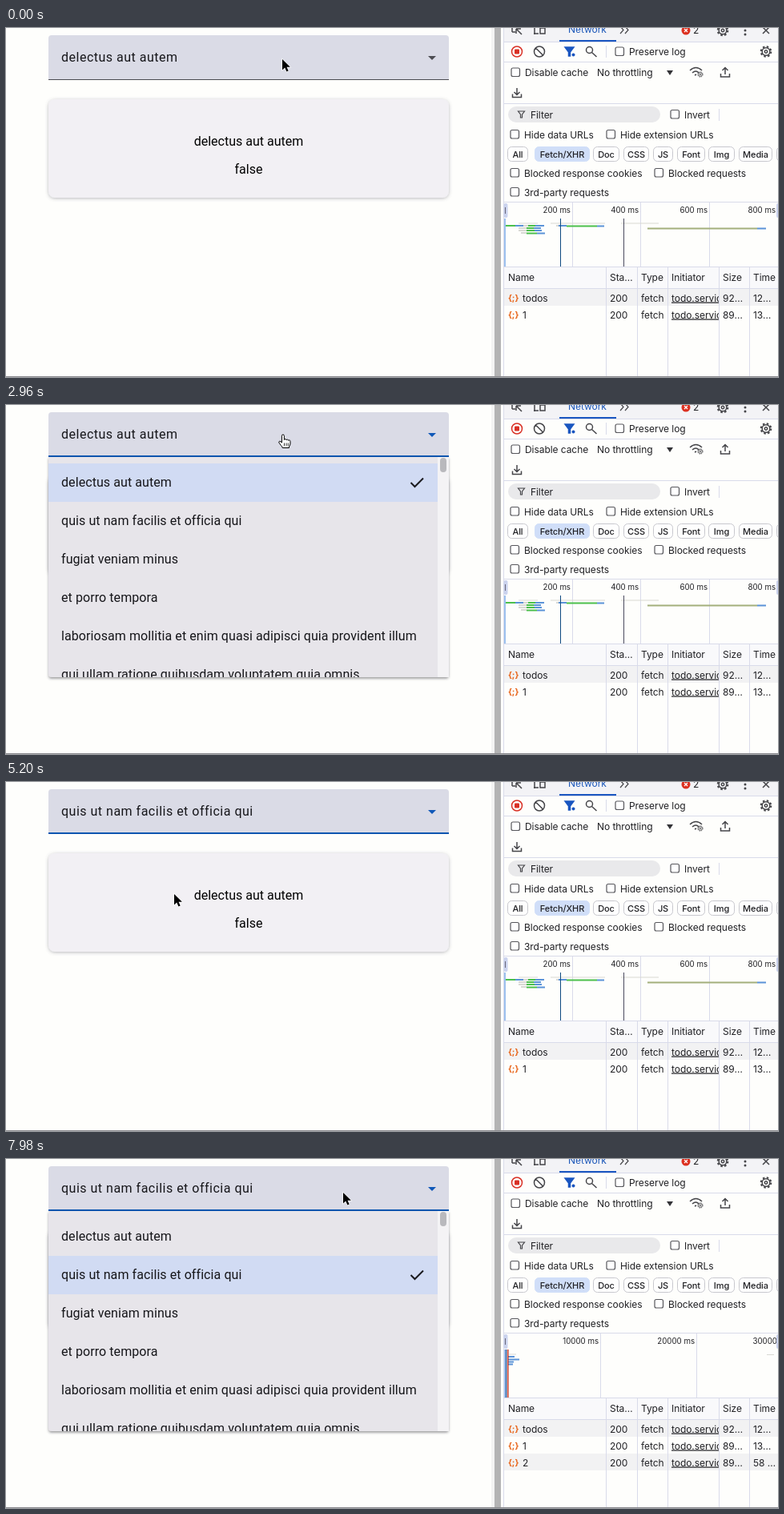
An HTML page that plays this animation: 964x436 px, repeating every 8 s.

```html
<!DOCTYPE html>
<html lang="en">
<head>
<meta charset="utf-8">
<title>Todo select with network panel</title>
<style>
html, body { margin: 0; width: 100%; height: 100%; overflow: hidden; background: #fefefc; }
svg { display: block; width: 964px; height: 436px; }
text { white-space: pre; }
.app { font: 16px Roboto, sans-serif; fill: #16161a; }
.field { letter-spacing: .5px; }
.list { letter-spacing: .08px; }
.card { text-anchor: middle; fill: #000; }
.ui { font: 12px Inter, sans-serif; letter-spacing: -.06px; fill: #202024; }
.chip { font: 500 11px Inter, sans-serif; text-anchor: middle; letter-spacing: -.1px; fill: #202024; }
.tick { font: 9.7px Inter, sans-serif; text-anchor: end; fill: #202024; }
.icon { fill: none; stroke: #454549; stroke-width: 1.5; }
.line { stroke: #d9dbea; }
</style>
</head>
<body>
<svg viewBox="0 0 964 436" id="stage">
  <defs>
    <filter id="soft" x="-5%" y="-10%" width="110%" height="125%">
      <feDropShadow dx="0" dy="1" stdDeviation="2" flood-color="#55555f" flood-opacity=".4"/>
    </filter>
    <filter id="lift" x="-5%" y="-10%" width="110%" height="125%">
      <feDropShadow dx="0" dy="2" stdDeviation="1.6" flood-color="#33333a" flood-opacity=".45"/>
    </filter>
    <clipPath id="panelClip"><rect x="53" y="65" width="500" height="275"/></clipPath>
    <clipPath id="nameClip"><rect x="828" y="326" width="62" height="70"/></clipPath>
  </defs>
  <rect width="964" height="436" fill="#fefefc"/>
  <g id="app">
    <path id="fieldBox" d="M53 65V13q0-4 4-4H549q4 0 4 4V65z"/>
    <text id="fieldText" class="app field" x="69" y="42"/>
    <path id="caret" d="M527 35h10l-5 5z"/>
    <rect id="underline" x="53" width="500"/>
    <rect x="53" y="89" width="500" height="123" rx="8" fill="#f2f0f4" filter="url(#soft)"/>
    <text id="cardText" class="app card" x="303" y="147"/>
    <text class="app card" x="303" y="182">false</text>
  </g>
  <g id="panel">
    <path d="M53 65H553V336q0 4-4 4H57q-4 0-4-4z" fill="#e7e5ea" filter="url(#lift)"/>
    <rect x="539" y="65" width="14" height="275" fill="#f4f3f5"/>
    <rect x="542" y="66" width="8" height="18" rx="4" fill="#b9b9bd"/>
    <rect id="hover" x="53" y="121" width="486" height="48" fill="#d5d2d6"/>
    <rect id="chosen" x="53" width="486" height="48" fill="#d1dbf3"/>
    <g id="items" clip-path="url(#panelClip)"/>
    <path id="check" d="M505.500 97l5 5L521 91.500" fill="none" stroke="#1a1a1e" stroke-width="2"/>
  </g>
  <g id="tools"></g>
  <g id="early"></g>
  <g id="late"></g>
  <path d="M0 435.500H964" stroke="#8b8b8f"/>
  <g id="cursor">
    <path id="arrow" d="M0 0V13.500l3.200-3 2.200 5 2.300-1-2.200-4.700h4.400z" fill="#000" stroke="#fff" stroke-width="1.200" paint-order="stroke"/>
    <g id="hand" stroke="#000" fill="#fff">
      <path d="M-1.600 10V1.500a1.500 1.500 0 0 1 3 0V6.500a1.400 1.400 0 0 1 2.700.3 1.400 1.400 0 0 1 2.600.6 1.300 1.300 0 0 1 2.300 1V11q0 2-1.500 4v1.500H-.8q0-1.500-2-3.200L-5 10.200q-.8-1.600.6-1.900 1.400-.1 2.800 1.700z"/>
      <path d="M1.500 10.500v3.500M4 10.500v3.500M6.300 10.500v3.500" stroke-width=".8"/>
    </g>
  </g>
</svg>
<script>
const LOOP = 8000, WAKE = 1000, OPEN = 2750, PICK = 5080, LOADED = 5300, REOPEN = 7300;
const titles = [
  'delectus aut autem', 'quis ut nam facilis et officia qui', 'fugiat veniam minus',
  'et porro tempora', 'laboriosam mollitia et enim quasi adipisci quia provident illum',
  'qui ullam ratione quibusdam voluptatem quia omnis'
];
const $ = id => document.getElementById(id);
const set = (id, attrs) => { for (const k in attrs) $(id).setAttribute(k, attrs[k]); };
const show = (id, on) => set(id, { visibility: on ? 'visible' : 'hidden' });

// Markup helpers
const text = (x, y, s, cls = 'ui', more = '') => `<text class="${cls}" x="${x}" y="${y}" ${more}>${s}</text>`;
const rect = (x, y, w, h, fill, more = '') => `<rect x="${x}" y="${y}" width="${w}" height="${h}" fill="${fill}" ${more}/>`;
const path = (d, more = '') => `<path class="icon" d="${d}" ${more}/>`;
const rule = d => `<path class="line" d="${d}"/>`;
const box = (x, y, label) =>
  rect(x - 5, y - 5.500, 10.500, 10.500, '#fff', 'rx="2" stroke="#57575c" stroke-width="1.200"') + text(x + 12, y + 4.500, label);
const chip = (x, w, label, on) =>
  rect(x + .5, 148.500, w - 1, 18, on ? '#d0def8' : '#fefefe', `rx="5" stroke="${on ? '#d0def8' : '#c8c8ce'}"`) +
  text(x + w / 2, 162, label, 'chip');
const gear = (x, y, size = 1) =>
  `<g transform="translate(${x} ${y}) scale(${size})"><circle class="icon" r="4.800"/><circle class="icon" r="1.700"/>` +
  `<circle class="icon" r="6.300" style="stroke-width:2;stroke-dasharray:2.500 2.450"/></g>`;
const bar = (x1, x2, y, fill) => rect(x1, y, x2 - x1, 2, fill);
const columns = (y1, y2) => [749.500, 788.500, 826.500, 890.500, 928.500].map(x => rule(`M${x} ${y1}V${y2}`)).join('');
const stripe = y => rect(622, y, 342, 21, '#f2f2f3');

function toolbar() {
  return rect(606, 0, 358, 436, '#fefefc') +
    rect(606, 0, 4, 436, '#f3f3f3') + rect(610, 0, 8, 436, '#b3b3b4') + rule('M621.500 0V436') +
    rect(622, 0, 342, 17, '#f3f3f6') + rule('M622 17.500H964') +
    path('M636 5h-4M632 5V0M644 0v-1M637 1l7 7M637 1v6M637 1h6') +
    path('M660 8V-2M659 7h6M667 7V0h6v7z') +
    text(702, 6, 'Network', 'ui', 'style="fill:#1a56b8"') + rect(691, 15, 71, 2, '#1a56c0') +
    path('M767-2l4 4.500-4 4.500M773-2l4 4.500-4 4.500', 'style="stroke-width:1.200"') +
    '<circle cx="849" cy="3" r="5.500" fill="#dc3020"/><path d="M847 1l4 4M851 1l-4 4" stroke="#fff" stroke-width="1.300"/>' +
    text(858, 7, '2') + gear(895, 3) +
    [-2, 3, 8].map(y => `<circle cx="923" cy="${y}" r="1.500" fill="#454549"/>`).join('') +
    path('M945-1l8 8M953-1l-8 8') +

    '<circle cx="638" cy="29.500" r="6.500" fill="none" stroke="#d93025" stroke-width="1.500"/>' +
    rect(635, 26.500, 6, 6, '#d93025', 'rx="1"') +
    path('M661.500 25l9 9M672.500 29.500a6.500 6.500 0 1 1-13 0a6.500 6.500 0 1 1 13 0z') +
    path('M698 24h11l-4.500 6v5h-2v-5z', 'style="stroke:#1a56c0;fill:#1a56c0"') +
    '<circle cx="708.500" cy="33.500" r="2" fill="#1a56c0"/>' +
    path('M732.500 27.500a4 4 0 1 1-8 0a4 4 0 1 1 8 0M731.500 30.500l6 5.500') +
    rule('M749.500 22V37') + box(766, 29.500, 'Preserve log') + gear(949, 29.500) + rule('M622 42.500H964') +

    box(636, 55.500, 'Disable cache') + text(738, 60, 'No throttling') +
    '<path d="M825 53h8l-4 6z" fill="#333337"/>' +
    path('M854 53q7.500-7 15 0M857 56q4.500-4 8 0M860 59l2-1') + gear(867, 58, .5) +
    path('M898 58V50M894.500 53l3.500-3.500 3.500 3.500M892.500 57v4h11v-4') +
    path('M638 75v8M634.500 80l3.500 3.500 3.500-3.500M632.500 82.500v4h11v-4') + rule('M622 94.500H964') +

    rect(627, 98, 190, 20, '#e9e9eb', 'rx="10"') +
    path('M639.500 104h8l-3 4v4h-2v-4z', 'style="stroke-width:1.200"') + text(655, 112.500, 'Filter') +
    box(835, 108, 'Invert') + rule('M890.500 101V116') +
    box(635, 133, 'Hide data URLs') + box(755, 133, 'Hide extension URLs') +
    chip(626, 26, 'All') + chip(660, 69, 'Fetch/XHR', true) + chip(733, 33, 'Doc') + chip(771, 32, 'CSS') +
    chip(808, 25, 'JS') + chip(838, 35, 'Font') + chip(877, 33, 'Img') + chip(915, 42, 'Media') + chip(962, 40, '') +
    box(635, 181, 'Blocked response cookies') + box(815, 181, 'Blocked requests') + box(635, 205, '3rd-party requests') +
    rule('M622 217.500H964') + rule('M622 298.500H964') +
    rect(622, 299, 342, 26, '#f9f9fb') + stripe(326) + rule('M622 325.500H964');
}

function row(y, name, size, time) {
  return text(627, y + 4, '{;}', 'ui', 'style="font-weight:700;font-size:10.500px;fill:#e8651a"') +
    text(645, y + 4.500, name) + text(754, y + 4.500, '200') + text(793, y + 4.500, 'fetch') +
    text(831, y + 4.500, 'todo.service.ts', 'ui', 'text-decoration="underline" clip-path="url(#nameClip)"') +
    text(895, y + 4.500, size) + text(933, y + 4.500, time);
}

function table() {
  const heads = [[627, 'Name'], [754, 'Sta…'], [793, 'Type'], [831, 'Initiator'], [895, 'Size'], [933, 'Time']];
  return columns(299, 436) + heads.map(([x, s]) => text(x, 316, s)).join('') +
    row(337, 'todos', '92…', '12…') + row(358, '1', '89…', '13…');
}

const handles = () =>
  rect(621.500, 219, 5, 18, '#cbd3ee', 'rx="2"') + rect(623, 224, 1, 8, '#66667a') + rect(962, 219, 5, 18, '#cbd3ee', 'rx="2"');

function shortTimeline() {
  const green = '#4cc04c', blue = '#5b93d8', pale = '#d9d9d4', olive = '#a3b07c';
  return [707.500, 792.500, 878.500].map(x => rule(`M${x} 218V298`)).join('') +
    [[705, 200], [790, 400], [876, 600], [961, 800]].map(([x, n]) => text(x, 231, n + ' ms', 'tick')).join('') +
    rect(622, 238, 2, 60, '#9cc0ee') +
    bar(624, 636, 246, green) + bar(636, 646, 246, blue) + bar(646, 652, 246, pale) + bar(652, 661, 246, green) + bar(661, 672, 246, blue) +
    bar(640, 650, 249, pale) + bar(650, 659, 249, green) + bar(659, 668, 249, blue) +
    bar(640, 650, 252, pale) + bar(650, 660, 252, green) + bar(660, 669, 252, blue) +
    bar(643, 650, 255, pale) + bar(650, 663, 255.500, green) + bar(663, 673, 255.500, blue) +
    rect(640, 243.500, 24, 1, pale) + rect(680, 243.500, 68, 1, pale) + rect(768, 243.500, 47, 1, pale) +
    bar(687, 690, 246, pale) + bar(690, 700, 246, blue) + bar(700, 738, 246.500, green) + bar(738, 747, 246.500, blue) +
    bar(801, 938, 249.500, olive) + bar(938, 949, 249.500, blue) +
    rect(692, 238, 1, 60, '#0f4a80') + rect(771, 238, 1, 60, '#4a4a5e') + handles();
}

function longTimeline() {
  const blue = '#5b93d8', pale = '#d9d9d4';
  return [742.500, 862.500].map(x => rule(`M${x} 218V298`)).join('') +
    text(740, 231, '10000 ms', 'tick') + text(860, 231, '20000 ms', 'tick') +
    text(932.500, 231, '30000 ms', 'tick', 'style="text-anchor:start"') +
    bar(627, 635, 246, blue) + bar(627, 641, 249.500, blue) + bar(627, 634, 252.500, blue) + bar(627, 633, 255.500, blue) +
    rect(628, 243.500, 9, 1, pale) + rect(950, 244, 9, 1, pale) +
    rect(622, 238, 2, 60, '#9cc0ee') + rect(624, 238, 1.200, 60, '#174a8c') + rect(626, 238, 1.500, 60, '#c93a28') + handles() +
    stripe(368) + columns(368, 389) + row(379, '2', '89…', '58 …');
}

$('tools').innerHTML = toolbar() + table();
$('early').innerHTML = shortTimeline();
$('late').innerHTML = longTimeline();
$('items').innerHTML = titles.map((s, i) => text(69, 102 + 48 * i, s, 'app list')).join('');

// Pointer stops: time, x, y
const stops = [
  [0, 345, 39], [WAKE, 345, 39], [1250, 347, 33], [2000, 347, 33], [2400, 346, 37], [3100, 346, 37],
  [3780, 229, 121], [4200, 210, 140], [5600, 210, 140], [6450, 426, 30],
  [6850, 426, 30], [7150, 421, 42], [LOOP, 421, 42]
];
const clamp = u => Math.max(0, Math.min(1, u));
const ramp = (t, start, ms) => clamp((t - start) / ms);
const mix = (a, b, u) => `rgb(${a.map((v, i) => Math.round(v + (b[i] - v) * u))})`;

// Speed through a stop; zero where the pointer rests
function slope(i, k) {
  const [a, b, c] = [stops[i - 1], stops[i], stops[i + 1]];
  if (!a || !c || a[k] === b[k] || b[k] === c[k]) return 0;
  return (c[k] - a[k]) / (c[0] - a[0]);
}

function pointer(t) {
  const i = Math.max(1, stops.findIndex(s => s[0] > t));
  const [a, b] = [stops[i - 1], stops[i]];
  const ms = b[0] - a[0], u = (t - a[0]) / ms, e = u * u * (3 - 2 * u);
  return [1, 2].map(k => a[k] + (b[k] - a[k]) * e +
    ms * u * (1 - u) * (slope(i - 1, k) * (1 - u) - slope(i, k) * u));
}

function update(t) {
  const picked = t >= PICK, loaded = t >= LOADED, focused = t >= OPEN;
  const enter = picked ? ramp(t, REOPEN, 120) : ramp(t, OPEN, 120);
  const leave = picked && t < REOPEN ? 1 - ramp(t, PICK, 100) : 0;
  const hovered = ramp(t, WAKE, 75) * (1 - ramp(t, OPEN, 75));
  const [x, y] = pointer(t);

  set('fieldBox', { fill: mix([218, 219, 230], [203, 203, 213], hovered) });
  $('fieldText').textContent = titles[+picked];
  $('cardText').textContent = titles[+loaded];
  set('caret', { fill: focused ? '#1058b8' : '#4c4c52' });
  set('underline', {
    y: focused ? 63 : 64, height: focused ? 2 : 1,
    fill: focused ? '#0a55b0' : mix([74, 74, 80], [20, 20, 24], hovered)
  });

  const scale = leave ? 1 : .8 + .2 * enter;
  set('panel', { opacity: Math.max(enter, leave), transform: `translate(0 ${65 * (1 - scale)}) scale(1 ${scale})` });
  set('chosen', { y: picked ? 121 : 73 });
  set('check', { transform: `translate(0 ${picked ? 48 : 0})` });
  show('hover', y >= 120 && t < PICK);

  show('early', !loaded);
  show('late', loaded);

  // An open list covers the field, so only its options are clickable
  const covered = (t >= OPEN + 320 && t < PICK + 100) || t >= REOPEN + 320;
  const hand = covered ? y > 65 : t >= WAKE && y < 65;
  set('cursor', { transform: `translate(${x.toFixed(1)} ${y.toFixed(1)})` });
  show('hand', hand);
  show('arrow', !hand);
}

const begin = performance.now();
function tick() {
  update((performance.now() - begin) % LOOP);
  requestAnimationFrame(tick);
}
tick();
</script>
</body>
</html>
```
